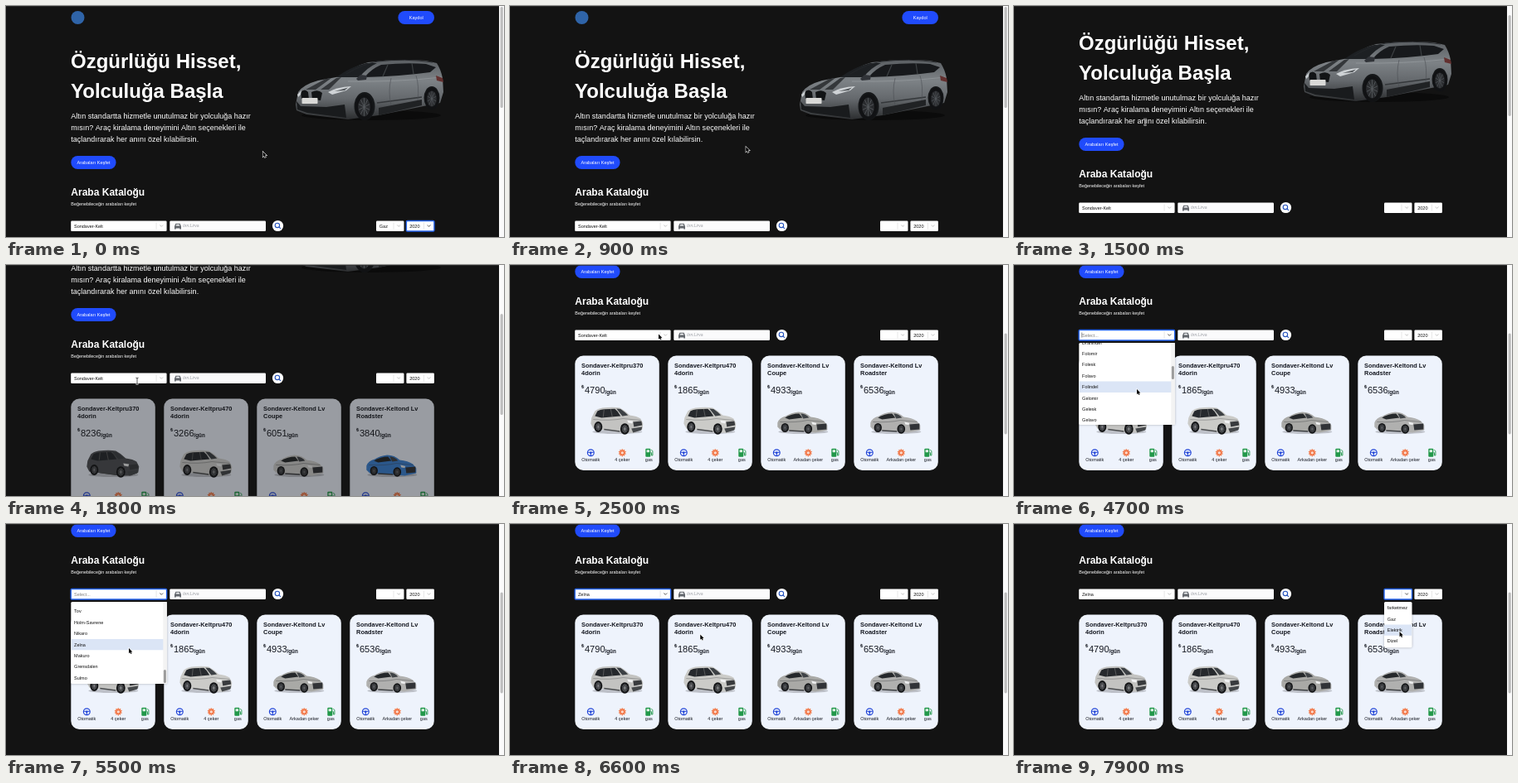
These frames come from a looping animation (600x279 px, 8 s). An HTML page with a canvas:

```html
<!DOCTYPE html>
<html lang="tr">
<head>
<meta charset="utf-8">
<title>Araba Kataloğu</title>
<style>
html, body { margin: 0; width: 100%; height: 100%; overflow: hidden; background: #131313; }
canvas { display: block; width: 600px; height: 279px; }
</style>
</head>
<body>
<canvas id="stage"></canvas>
<script>
const W = 600, H = 279, LOOP = 8000, STEP = 100;
const FONT = '"Liberation Sans", Arial, sans-serif';
const BG = '#131313', BLUE = '#204bfc', INK = '#14171f', HOVER = '#dbe5f6';
const canvas = document.getElementById('stage');
const ctx = canvas.getContext('2d');
const dpr = window.devicePixelRatio || 1;
canvas.width = W * dpr;
canvas.height = H * dpr;

// Event times in ms
const BLUR_YEAR = 200, CLEAR_FUEL = 500, NEW_PRICES = 2100, OPEN_MAKE = 3000,
  PICK_MAKE = 6300, OPEN_FUEL = 7300, ARROW_BACK = 2000;

const scrollKeys = [[1400, 0], [1500, 22], [1600, 58], [1700, 98], [1800, 129], [1900, 151], [2000, 166], [2200, 181]];
const fadeKeys = [[1600, 0], [1800, 0.61], [2000, 1]];
const listKeys = [[4400, 0], [5300, 1]];
const pointerX = [[800, 309.5], [1400, 158], [2000, 158], [2400, 179], [2700, 179], [2900, 182], [3950, 182], [4350, 148], [6400, 148], [7200, 473], [7400, 473], [7800, 464.5]];
const pointerY = [[800, 176], [1400, 140], [2000, 140], [2400, 83.5], [2700, 83.5], [2900, 82.5], [3950, 82.5], [4350, 150], [6400, 150], [7200, 84], [7400, 84], [7800, 130]];

const brand = 'Sondaver-Kelt';
const firstMakes = ['Orvia', 'Ulma Dorelo', 'Calden Norvik', 'Elno', 'Hestrow', 'KVR', 'Dolip', 'Gaddorin'];
const lastMakes = ['Pelinor', 'Tov', 'Holm-Savrene', 'Nikaro', 'Zelna', 'Makuro', 'Grensdalen', 'Sulmo'];
const heads = ['Dran', 'Fol', 'Gel', 'Hov', 'Jun', 'Kar', 'Lun'], tails = ['omir', 'esk', 'avo', 'indel'];
const middleMakes = Array.from({ length: 26 }, (_, i) => heads[i * 7 / 26 | 0] + tails[i % 4]);
const makes = [...firstMakes, ...middleMakes, ...lastMakes];
const fuels = ['farketmez', 'Gaz', 'Elektrik', 'Dizel'];

const cards = [
  { title: ['pru370', '4dorin'], prices: [8236, 4790], drive: '4 çeker', suv: true, paints: ['#4c4f53', '#c3c3c1'] },
  { title: ['pru470', '4dorin'], prices: [3266, 1865], drive: '4 çeker', suv: true, paints: ['#d2d2d0', '#cbcbc8'] },
  { title: ['ond Lv', 'Coupe'], prices: [6051, 4933], drive: 'Arkadan çeker', paints: ['#d0d0cf', '#a9a9a6'] },
  { title: ['ond Lv', 'Roadster'], prices: [3840, 6536], drive: 'Arkadan çeker', paints: ['#3b82d6', '#b0b0af'] }
];

function along(t, keys) {
  if (t <= keys[0][0]) return keys[0][1];
  for (let i = 1; i < keys.length; i++) {
    const [t1, v1] = keys[i], [t0, v0] = keys[i - 1];
    if (t <= t1) return v0 + (v1 - v0) * (t - t0) / (t1 - t0);
  }
  return keys[keys.length - 1][1];
}

function text(s, x, y, size, color = '#fff', weight = 'normal', align = 'left') {
  ctx.font = `${weight} ${size}px ${FONT}`;
  ctx.textAlign = align;
  ctx.fillStyle = color;
  ctx.fillText(s, x, y);
}

function box(x, y, w, h, r, fill, stroke, lw = 0.8) {
  ctx.beginPath();
  ctx.roundRect(x, y, w, h, r);
  if (fill) { ctx.fillStyle = fill; ctx.fill(); }
  if (stroke) { ctx.strokeStyle = stroke; ctx.lineWidth = lw; ctx.stroke(); }
}

function oval(x, y, rx, ry, fill, stroke, lw = 1) {
  ctx.beginPath();
  ctx.ellipse(x, y, rx, ry, 0, 0, Math.PI * 2);
  if (fill) { ctx.fillStyle = fill; ctx.fill(); }
  if (stroke) { ctx.strokeStyle = stroke; ctx.lineWidth = lw; ctx.stroke(); }
}

function shape(d, fill) {
  ctx.fillStyle = fill;
  ctx.fill(new Path2D(d));
}

function line(d, color, lw) {
  ctx.strokeStyle = color;
  ctx.lineWidth = lw;
  ctx.stroke(new Path2D(d));
}

function spokes(x, y, rx, ry, n, color, lw) {
  ctx.strokeStyle = color;
  ctx.lineWidth = lw;
  ctx.beginPath();
  for (let i = 0; i < n; i++) {
    const a = i * Math.PI * 2 / n - Math.PI / 2;
    ctx.moveTo(x, y);
    ctx.lineTo(x + rx * Math.cos(a), y + ry * Math.sin(a));
  }
  ctx.stroke();
}

function wheel(x, y, rx, ry, rim) {
  oval(x, y, rx, ry, '#111214');
  oval(x, y, rx * 0.7, ry * 0.74, '#2a2c2f');
  spokes(x, y, rx * 0.66, ry * 0.7, 10, rim, rx * 0.08);
}

function pill(x, y, w, label) {
  box(x, y, w, 16, 8, BLUE);
  text(label, x + w / 2, y + 10, 5.6, '#fff', 'normal', 'center');
}

function heroCar() {
  oval(440, 132, 84, 6, '#0b0b0b');
  const paint = ctx.createLinearGradient(0, 65, 0, 137);
  paint.addColorStop(0, '#5a5e62');
  paint.addColorStop(0.35, '#7d8286');
  paint.addColorStop(0.65, '#65696d');
  paint.addColorStop(1, '#2c2e30');
  shape('M349 119L352 104Q358 95 376 90L403 85Q418 73 436 68Q470 63 506 66L519 69Q524 77 526 87L527 104L523 117L503 121L449 132L412 137L362 131L350 126Z', paint);
  shape('M398 86Q414 74 434 69L447 69Q434 75 426 86Z', '#1d2023');
  shape('M432 86Q440 76 452 71Q482 68 506 70L518 74L511 80Q475 85 432 86Z', '#17191c');
  line('M460 71L454 85M489 69L491 82', '#3c4043', 1.2);
  line('M410 82Q430 70 448 67Q480 63 514 68', '#25282b', 0.9);
  shape('M361 101L385 88L392 87L373 101ZM379 101L398 87L404 86L389 101Z', '#34373a');
  line('M412 91Q470 92 525 86', '#94999c', 0.8);
  line('M447 117L501 110', '#34373a', 1.4);
  line('M464 87Q460 103 464 120M494 84Q498 96 496 114', '#4a4e52', 0.6);
  shape('M449 123L501 113L501 120L449 132Z', '#202224');
  shape('M355 104Q360 99 364 104L365 113L356 112ZM368 104Q376 100 381 105L379 114L369 113Z', '#121416');
  shape('M350 115L355 121L386 122L408 119L410 135L363 129L351 125Z', '#191b1d');
  shape('M388 104Q398 98 416 97L410 102L393 107Z', '#cfd3d6');
  shape('M396 103L412 98.5L408 102Z', '#53575b');
  shape('M351 107L356 102L355 107L352 110Z', '#c9cdd0');
  shape('M422 88L427 83L435 84L434 89L424 90Z', '#303338');
  shape('M518 84L526 87L527 92L519 90Z', '#63302f');
  oval(432, 121, 12.5, 17, '#151719');
  oval(513, 111, 9.5, 14, '#151719');
  wheel(431.5, 122, 10.5, 15.5, '#565a5e');
  wheel(513, 112, 8.3, 13, '#565a5e');
  box(356.5, 111, 19, 7, 0.8, '#d9d9d7');
}

function smallCar(x, y, suv, paint) {
  ctx.save();
  ctx.translate(x, y);
  oval(33, 30, 30, 2.6, 'rgba(40,40,45,.25)');
  if (suv) {
    shape('M2 13L6 5Q9 2 15 1Q28 -0.5 36 1Q42 4 48 10Q57 11 61 14L64 20L63 27L54 31L40 31L4 26L1 20Z', paint);
    shape('M6 11L9 5Q12 3 17 2.7L30 2.2Q34 5 37 11L14 13Z', '#26292d');
    shape('M32 2L37 2.6Q42 6 46 10L39 11Z', '#3c4044');
    line('M17 3L16 12M25 2.5L27 12', '#777', 0.6);
    line('M4 15Q24 17 40 14L61 16', 'rgba(80,82,85,.55)', 0.7);
    line('M17 27L36 29.5', '#4a4c4f', 1.4);
    shape('M52 18L62 17L63 22L53 24Z', '#393b3e');
    shape('M45 16L52 17L51 20L46 19Z', '#f0f1f2');
    shape('M50 26L63 24L62 28L52 31Z', '#45484b');
    wheel(10, 24, 5, 6.5, '#a1a3a6');
    wheel(42, 26.5, 5.4, 6.8, '#a1a3a6');
  } else {
    shape('M2 19Q4 13 12 11Q18 7 27 6Q36 6 42 12Q52 13 58 17L62 22L62 28L48 31L38 30L6 28L2 24Z', paint);
    shape('M11 13Q19 8 28 8L32 13L16 15Z', '#25282b');
    shape('M30 8Q36 8 40 13L33 14Z', '#3f4347');
    line('M5 18Q25 19 38 16L58 18', 'rgba(60,62,65,.55)', 0.7);
    line('M16 28.5L34 29.5', '#3e4043', 1.3);
    shape('M49 21L61 20L61 27L50 28Z', '#313337');
    shape('M43 18L49 19.5L48 21.5L44 21Z', '#f0f1f2');
    wheel(11, 25, 4.6, 5.6, '#77797c');
    wheel(39, 26.5, 4.8, 5.8, '#77797c');
  }
  ctx.restore();
}

function cardIcons(x, y) {
  oval(x + 19, y, 3.9, 3.9, null, '#2447d8', 1.2);
  line(`M${x + 15.4} ${y - 0.5}H${x + 22.6}M${x + 19} ${y}V${y + 3.6}`, '#2447d8', 1.1);
  oval(x + 19, y, 1.3, 1.3, '#2447d8');

  oval(x + 57, y, 3.5, 3.5, '#f27a4b');
  spokes(x + 57, y, 4.6, 4.6, 10, '#f27a4b', 1.2);
  oval(x + 57, y, 1.6, 1.6, '#fbd9cb');

  box(x + 85, y - 5, 6, 10, 1, '#22984a');
  box(x + 86.3, y - 3.6, 3.4, 3, 0.4, '#dff1e5');
  line(`M${x + 91} ${y}H${x + 92.2}V${y + 3.2}H${x + 93.6}V${y - 2}L${x + 92} ${y - 3.8}`, '#22984a', 0.9);
}

function card(c, i, t) {
  const x = 78.3 + i * 112, y = 290.5, now = t < NEW_PRICES ? 0 : 1;
  box(x, y, 101.5, 138.5, 10, '#eef3fc');
  text(brand + c.title[0], x + 7.8, y + 14.2, 7.4, INK, 'bold');
  text(c.title[1], x + 7.8, y + 23, 7.4, INK, 'bold');
  text('₺', x + 7.8, y + 39.5, 5.6, INK, 'bold');
  text(c.prices[now], x + 11.6, y + 45, 11.1, INK);
  text('/gün', x + 36.2, y + 46, 6.3, INK, 'bold');
  smallCar(x + 18, y + 62, c.suv, c.paints[now]);
  cardIcons(x, y + 117.3);
  [['Otomatik', 19], [c.drive, 57], ['gas', 89]].forEach(([s, dx]) =>
    text(s, x + dx, y + 127.3, 5.5, INK, 'normal', 'center'));
}

function select(x, w, value, focused, empty) {
  const y = 259.5, cx = x + w - 6.3, cy = 265.4;
  box(x, y, w, 12.5, 1.2, '#fff', focused && '#2463ee', 1.4);
  text(value, x + 3.8, 267.5, 5.5, empty ? '#808080' : '#111');
  line(`M${x + w - 12.5} 261.5V269.5`, '#ccc', 0.5);
  line(`M${cx - 1.9} ${cy - 0.9}L${cx} ${cy + 1}L${cx + 1.9} ${cy - 0.9}`, focused ? '#444' : '#bbb', 0.9);
}

function toolbar(t) {
  const making = t >= OPEN_MAKE && t < PICK_MAKE;
  const make = making ? 'Select...' : t < OPEN_MAKE ? brand : 'Zelna';
  select(78.2, 115.4, make, t >= OPEN_MAKE && t < OPEN_FUEL, making);
  if (making && Math.floor((t - 2900) / 530) % 2) line('M81.8 262.5V268.5', '#222', 0.5);

  box(197.3, 259.5, 115.7, 12.5, 1.2, '#fbfbfc');
  shape('M203 266L204.4 262.8H209.6L211 266V269.6H209.3V268.6H204.7V269.6H203Z', '#63676d');
  shape('M204.6 265.4L205.4 263.7H208.6L209.4 265.4Z', '#eef0f2');
  text('örn:Lirva', 213, 267.3, 5, '#9a9da3', 'italic');

  oval(327.5, 265.5, 6.6, 6.6, '#fff');
  oval(326.9, 264.9, 2.7, 2.7, null, '#2553bd', 1.1);
  line('M328.9 266.9L330.9 268.9', '#2553bd', 1.2);

  select(446, 33.5, t < CLEAR_FUEL ? 'Gaz' : '', t >= OPEN_FUEL);
  select(482.4, 33.5, '2020', t < BLUR_YEAR);
}

// Cards fade as one group, so the page colour is laid over them.
function catalog(t) {
  const fade = along(t, fadeKeys);
  if (fade === 0) return;
  cards.forEach((c, i) => card(c, i, t));
  ctx.save();
  ctx.globalAlpha = 1 - fade;
  box(70, 285, 455, 150, 0, BG);
  ctx.restore();
}

function page(t) {
  oval(86.5, 14, 8, 8, '#2f64a8');
  pill(472.4, 6, 43.6, 'Kaydol');
  text('Özgürlüğü Hisset,', 78, 75, 24, '#fff', 'bold');
  text('Yolculuğa Başla', 78, 110.7, 24, '#fff', 'bold');
  ['Altın standartta hizmetle unutulmaz bir yolculuğa hazır',
    'mısın? Araç kiralama deneyimini Altın seçenekleri ile',
    'taçlandırarak her anını özel kılabilirsin.'
  ].forEach((s, i) => text(s, 78.3, 136.4 + i * 13.7, 9.02));
  heroCar();
  pill(78.3, 181, 54.3, 'Arabaları Keşfet');
  text('Araba Kataloğu', 78.3, 229.3, 12.04, '#fff', 'bold');
  text('Beğenebileceğin arabaları keşfet', 78.3, 240.8, 5.42);
  toolbar(t);
  catalog(t);
}

function menu(x, w, h, items, offset, px, py) {
  const top = 94, row = 13.35;
  const inside = px >= x && px <= x + w && py > top && py < top + h;
  const active = inside ? Math.floor((py - top - 0.7 + offset) / row) : 0;
  ctx.save();
  ctx.shadowColor = 'rgba(0,0,0,.3)';
  ctx.shadowBlur = 3 * dpr;
  box(x, top, w, h, 1.6, '#fff');
  ctx.restore();
  ctx.save();
  ctx.beginPath();
  ctx.roundRect(x, top, w, h, 1.6);
  ctx.clip();
  items.forEach((s, i) => {
    const y = top + 0.7 + i * row - offset;
    if (y > top + h || y < top - row) return;
    if (i === active) box(x, y, w, row, 0, HOVER);
    text(s, x + 3.8, y + 8.6, 5.5, '#111');
  });
  ctx.restore();
}

function makeMenu(t, px, py) {
  const h = 99, p = along(t, listKeys);
  const range = makes.length * 13.35 + 1.4 - h;
  menu(78.3, 115.5, h, makes, p * range, px, py);
  box(189.3, 94, 4.5, h, 0, '#f3f3f3');
  box(189.9, 95 + p * 81, 3, 16, 1.5, '#9c9c9c');
}

function pointer(t, x, y) {
  if (t >= 1400 && t < ARROW_BACK) {
    const d = `M${x - 1.6} ${y - 3.8}Q${x} ${y - 3.8} ${x} ${y - 2.8}Q${x} ${y - 3.8} ${x + 1.6} ${y - 3.8}M${x} ${y - 3}V${y + 3}M${x - 1.6} ${y + 3.8}Q${x} ${y + 3.8} ${x} ${y + 2.8}Q${x} ${y + 3.8} ${x + 1.6} ${y + 3.8}`;
    line(d, '#fff', 1.5);
    line(d, '#111', 0.7);
    return;
  }
  ctx.save();
  ctx.translate(x, y);
  const arrow = 'M0 0V6.2L1.4 4.9L2.4 7.1L3.5 6.6L2.5 4.5H4.4Z';
  line(arrow, '#fff', 1.1);
  shape(arrow, '#000');
  ctx.restore();
}

function draw(t) {
  const scroll = along(t, scrollKeys);
  const px = along(t, pointerX), py = along(t, pointerY);
  ctx.setTransform(dpr, 0, 0, dpr, 0, 0);
  ctx.fillStyle = BG;
  ctx.fillRect(0, 0, W, H);
  ctx.save();
  ctx.translate(0, -scroll);
  page(t);
  ctx.restore();

  if (t >= OPEN_MAKE && t < PICK_MAKE) makeMenu(t, px, py);
  if (t >= OPEN_FUEL) menu(446, 33.5, 55.2, fuels, 0, px, py);

  box(0, 0, W, 0.8, 0, '#2c2c2c');
  box(594, 0, 6, H, 0, '#fafafa');
  box(595.6, 1 + scroll * 0.45, 3.2, 122, 1.6, '#bdbdbd');
  pointer(t, px, py);
}

function tick() {
  const t = performance.now() % LOOP;
  draw(Math.floor(t / STEP) * STEP);
  requestAnimationFrame(tick);
}
tick();
</script>
</body>
</html>
```
